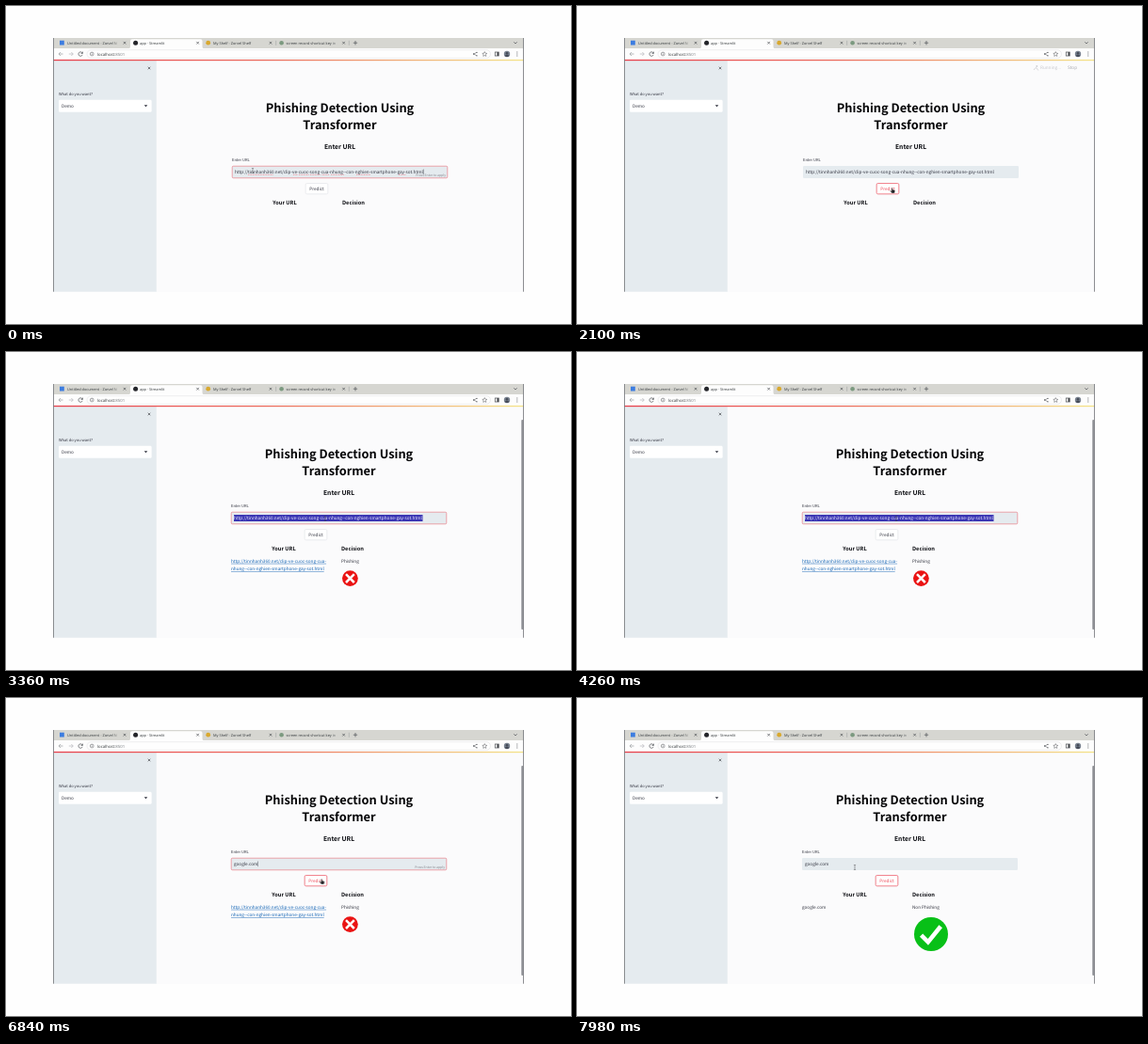
Recreate the animation shown at these times as an HTML page. Size 600 px wide and 338 px high, loop 8 s.

```html
<!DOCTYPE html>
<html lang="en">
<head>
<meta charset="utf-8">
<title>Phishing detection demo</title>
<style>
html, body { margin: 0; width: 100%; height: 100%; overflow: hidden; background: #fefefe; }
svg { display: block; width: 100%; height: 100%; }
text { font: 4.65px "Noto Sans CJK JP", "Noto Sans CJK SC", "Noto Sans CJK", "Open Sans", sans-serif; fill: #31333f; text-rendering: geometricPrecision; white-space: pre; }
.chrome text { font: 3.88px "Noto Sans", sans-serif; fill: #3c4043; }
.mid { text-anchor: middle; }
.h1 { font-size: 12.82px; font-weight: 700; fill: #050507; }
.h3 { font-size: 6.75px; font-weight: 700; fill: #0c0d12; }
.h4 { font-size: 5.72px; font-weight: 700; fill: #0c0d12; }
.label { font-size: 4.07px; }
.hint { font-size: 3.45px; fill: #85878f; text-anchor: end; }
.link { fill: #1465b5; text-decoration: underline; }
.icon { fill: none; stroke: #4c4f53; stroke-width: .7; }

/* visibility windows over the 8 s loop */
.on { animation: 8s step-end infinite; }
.edited { animation-name: edited; }
.hinted { animation-name: hinted; }
.focused { animation-name: focused; }
.selected { animation-name: selected; }
.address { animation-name: address; }
.active { animation-name: active; }
.running { animation-name: running; }
.phishing { animation-name: phishing; }
.safe { animation-name: safe; }
.scroll { animation-name: scroll; }
.beam { animation-name: beam; }
.hand { animation-name: hand; }
.content { animation-name: shift; }
.pointer { animation: move 8s ease-in-out infinite; }

@keyframes edited { 0% { opacity: 1 } 21.75%, 100% { opacity: 0 } }
@keyframes hinted { 0%, 55.5% { opacity: 1 } 21.75%, 86.25%, 100% { opacity: 0 } }
@keyframes focused { 0%, 37.5% { opacity: 1 } 21.75%, 86.25%, 100% { opacity: 0 } }
@keyframes selected { 0%, 55.5%, 100% { opacity: 0 } 40.5% { opacity: 1 } }
@keyframes address { 0% { opacity: 1 } 55.5%, 100% { opacity: 0 } }
@keyframes active { 0%, 37.5% { opacity: 0 } 18.75%, 81%, 100% { opacity: 1 } }
@keyframes running { 0%, 30.75%, 93%, 100% { opacity: 0 } 23.25%, 87% { opacity: 1 } }
@keyframes phishing { 0%, 93%, 100% { opacity: 0 } 30.75% { opacity: 1 } }
@keyframes safe { 0% { opacity: 0 } 93%, 100% { opacity: 1 } }
@keyframes scroll { 0% { opacity: 0 } 30.75%, 100% { opacity: 1 } }
@keyframes beam { 0%, 36%, 96%, 100% { opacity: 1 } 18%, 79.5% { opacity: 0 } }
@keyframes hand { 0%, 36%, 96%, 100% { opacity: 0 } 18%, 79.5% { opacity: 1 } }
@keyframes shift { 0% { transform: none } 30.75%, 100% { transform: translateX(-1px) } }
@keyframes move {
  0%, 4% { transform: translate(262px, 175px) }
  12%, 14% { transform: translate(349px, 181px) }
  19%, 34% { transform: translate(335px, 196px) }
  38%, 77% { transform: translate(339px, 177px) }
  81%, 94% { transform: translate(335.5px, 195px) }
  97.5%, 100% { transform: translate(295px, 180px) }
}
</style>
</head>
<body>
<svg viewBox="0 0 600 338">
  <defs>
    <linearGradient id="bar"><stop stop-color="#e8404c"/><stop offset=".45" stop-color="#ec6a5c"/><stop offset="1" stop-color="#f4e488"/></linearGradient>
    <linearGradient id="fade"><stop stop-color="#d6d6d1" stop-opacity="0"/><stop offset="1" stop-color="#d6d6d1"/></linearGradient>
    <path id="cross" d="M-1.3-1.3 1.3 1.3M1.3-1.3-1.3 1.3"/>
  </defs>
  <rect width="600" height="338" fill="#fefefe"/>

  <!-- page -->
  <rect x="50.5" y="57" width="499" height="246.7" fill="#fbfbfc"/>
  <rect x="50.5" y="57" width="109.3" height="246.7" fill="#e5ebef"/>
  <use href="#cross" class="icon" x="152" y="66"/>
  <text class="label" x="56" y="94.7">What do you want?</text>
  <rect x="56" y="99.7" width="98.6" height="13" rx="1.3" fill="#fff"/>
  <text x="59" y="107.9">Demo</text>
  <path d="M146.7 105.2h3.6l-1.8 2z" fill="#31333f"/>

  <g class="on running" fill="#a3a5ab">
    <circle cx="488.3" cy="64" r=".9" opacity=".5"/>
    <path d="M485 68l2-2.5 1.6 1 1.2 2" fill="none" stroke="#a3a5ab" stroke-width=".8" opacity=".5"/>
    <text x="492" y="67.3" font-size="4" opacity=".25">Running...</text>
    <text x="521" y="67.3" opacity=".4">Stop</text>
  </g>

  <g class="on content">
    <text class="h1 mid" x="354.5" y="113.3">Phishing Detection Using</text>
    <text class="h1 mid" x="354.5" y="130.5">Transformer</text>
    <text class="h3 mid" x="354.5" y="152.1">Enter URL</text>
    <text class="label" x="240" y="164.8">Enter URL</text>

    <rect x="240" y="170" width="229" height="13" rx="1.3" fill="#e5ebef"/>
    <rect class="on focused" x="240.2" y="170.2" width="228.6" height="12.6" rx="1.3" fill="none" stroke="#ec5663" stroke-width=".5"/>
    <text class="hint on hinted" x="467" y="181">Press Enter to apply</text>
    <text class="on address" id="address" x="243" y="178"></text>
    <path class="on edited" d="M257 179.3h27M305 179.3h5M311 179.3h11M323 179.3h11M335.5 179.3h8M345 179.3h14M372 179.3h15M417 179.3h8" stroke="#ef5060" stroke-width=".5" stroke-dasharray="1 .6"/>
    <g class="on selected">
      <rect x="243" y="173" width="200.5" height="7" fill="#3b36b4"/>
      <text id="picked" x="243" y="178" style="fill:#f1f1ff"></text>
    </g>
    <text id="typed" x="243" y="178"></text>
    <rect id="caret" y="173.5" width=".4" height="5.6" fill="#31333f"/>

    <rect x="318.2" y="188.5" width="23.6" height="11.3" rx="1.4" fill="#fff" stroke="#d9dbdf" stroke-width=".5"/>
    <text class="mid" x="330" y="195.6">Predict</text>
    <g class="on active">
      <rect x="318.2" y="188.5" width="23.6" height="11.3" rx="1.4" fill="#fff" stroke="#ef5362" stroke-width=".7"/>
      <text class="mid" x="330" y="195.6" style="fill:#ec4655">Predict</text>
    </g>

    <text class="h4 mid" x="296" y="211.1">Your URL</text>
    <text class="h4" x="357" y="211.1">Decision</text>
    <g class="on phishing">
      <text class="link" x="240" y="223.8">http://tinnhanh360.net/clip-ve-cuoc-song-cua-</text>
      <text class="link" x="240" y="232">nhung--con-nghien-smartphone-gay-sot.html</text>
      <text x="357" y="223.8">Phishing</text>
      <circle cx="366.4" cy="240.6" r="8.4" fill="#ea1313"/>
      <path d="M362 236.2l8.8 8.8M370.8 236.2l-8.8 8.8" stroke="#fff" stroke-width="2.5"/>
    </g>
    <g class="on safe">
      <text x="240" y="223.8">google.com</text>
      <text x="357" y="223.8">Non Phishing</text>
      <circle cx="377" cy="251" r="18" fill="#08c017"/>
      <path d="M366.6 252.2l7.2 7.2 13.4-16.6" fill="none" stroke="#fff" stroke-width="4.6"/>
    </g>
  </g>
  <rect class="on scroll" x="547.3" y="72" width="1.9" height="223" rx=".9" fill="#8f9196"/>

  <!-- browser frame -->
  <g class="chrome">
    <rect x="50.5" y="34" width="499" height="11.5" fill="#d6d6d1"/>
    <rect x="50.5" y="45" width="499" height="12" fill="#fdfdfd"/>
    <path d="M130 45.2q2 0 2-2v-6q0-2 2-2h72.5q2 0 2 2v6q0 2 2 2z" fill="#fdfdfd"/>
    <rect x="57" y="36.7" width="4.8" height="4.8" fill="#3d7de0"/>
    <circle cx="137.6" cy="39.3" r="2.5" fill="#25262b"/>
    <circle cx="214.7" cy="39.2" r="2.4" fill="#d9a92f"/>
    <circle cx="292.6" cy="39.2" r="2.3" fill="#7c9a80"/>
    <text x="65" y="40.6">Untitled document - Zorvel N</text>
    <text x="142" y="40.6">app · Streamlit</text>
    <text x="220" y="40.6">My Shelf - Zorvel Shelf</text>
    <text x="297.5" y="40.6">screen record shortcut key in</text>
    <rect x="113" y="36" width="9" height="7" fill="url(#fade)"/>
    <rect x="345" y="36" width="10" height="7" fill="url(#fade)"/>
    <rect x="122" y="36" width="2" height="7" fill="#d6d6d1"/>
    <rect x="355" y="36" width="1.2" height="7" fill="#d6d6d1"/>
    <g class="icon">
      <use href="#cross" x="126" y="39.2"/><use href="#cross" x="203.6" y="39.2"/>
      <use href="#cross" x="281" y="39.2"/><use href="#cross" x="358.6" y="39.2"/>
      <path d="M286.7 36.8v5M364.3 36.8v5" stroke="#85888c" stroke-width=".4"/>
      <path d="M368.8 39.2h4.4M371 37v4.4M539.3 38.3l1.7 1.7 1.7-1.7"/>
      <path d="M60.5 51h-4.4M58 49l-2 2 2 2" stroke="#999ca0"/>
      <path d="M66.8 51h4.4M69.3 49l2 2-2 2" stroke="#b5b7ba"/>
      <path d="M81.2 50.2a2.2 2.2 0 1 0 0 1.7M81.4 48.6v1.8h-1.8"/>
    </g>
    <rect x="86" y="46.7" width="428.5" height="8.6" rx="4.3" fill="#fefefe" stroke="#d3d5d7" stroke-width=".4"/>
    <g class="icon">
      <circle cx="91.2" cy="51" r="1.9" stroke-width=".5"/><path d="M91.2 50.6v1.4M91.2 49.6v.5" stroke-width=".5"/>
      <path d="M500 49.3l-3.3 1.7 3.3 1.8" stroke-width=".5"/>
      <path d="M500 49.3v.01M496.7 51v.01M500 52.8v.01" stroke-width="1.3" stroke-linecap="round"/>
      <path d="M508.3 48.6l.7 1.6 1.8.2-1.3 1.2.3 1.8-1.5-.9-1.5.9.3-1.8-1.3-1.2 1.8-.2z" stroke-width=".5"/>
      <rect x="519.3" y="49" width="4" height="4"/><path d="M522.2 49v4" stroke-width="1.6"/>
    </g>
    <text x="97" y="52.6" style="font-size:4.3px">localhost:<tspan fill="#7c8084">8501</tspan></text>
    <circle cx="532" cy="51" r="3.2" fill="#77808e"/>
    <path d="M529.6 53.1q2.4-3 4.8 0-2.4 2-4.8 0" fill="#454b57"/><circle cx="532" cy="50.2" r="1.2" fill="#454b57"/>
    <path d="M542.8 49v.01M542.8 51v.01M542.8 53v.01" stroke="#4c4f53" stroke-linecap="round"/>
  </g>
  <rect x="50.5" y="56.9" width="499" height="1.3" fill="url(#bar)"/>
  <path d="M50.5 34V303.7M549.5 34V303.7" stroke="#6f7276" stroke-width=".8"/>

  <g class="pointer">
    <path class="on beam" d="M-1.1-2.6q1.1 0 1.1.6 0-.6 1.1-.6M0-2V2M-1.1 2.6q1.1 0 1.1-.6 0 .6 1.1.6" fill="none" stroke="#3a3b40" stroke-width=".45"/>
    <path class="on hand" d="M-.9-2.4q.7-.6 1.1 0v1.5l2 .6q.7.3.5 1.2l-.6 2h-2.7l-2-2.3q.1-.8 1-.3l.7.5z" fill="#1e1f22" stroke="#fff" stroke-width=".3"/>
  </g>
</svg>
<script>
const LOOP = 8000;
const BLINK = 530;
const ADDRESS = "http://tinnhanh360.net/clip-ve-cuoc-song-cua-nhung--con-nghien-smartphone-gay-sot.html";
const WORD = "google.com";
const keyTimes = [4440, 4590, 4740, 4920, 5100, 5280, 5460, 5560, 5660, 5760];
const [address, picked, typed, caret] =
  ["address", "picked", "typed", "caret"].map(id => document.getElementById(id));
address.textContent = picked.textContent = ADDRESS;

let start;
function draw(now) {
  start ??= now;
  const t = (now - start) % LOOP;
  const count = keyTimes.filter(k => k <= t).length;
  const text = WORD.slice(0, count);
  if (typed.textContent !== text) typed.textContent = text;

  // the blink restarts with every key
  const lastKey = count ? keyTimes[count - 1] : -BLINK + 10;
  const editing = t < 1740 || (count && t < 6900);
  const lit = Math.floor((t - lastKey) / BLINK) % 2 === 0;
  const field = count ? typed : address;
  caret.setAttribute("x", 243.2 + field.getComputedTextLength());
  caret.setAttribute("opacity", editing && lit ? 1 : 0);
  requestAnimationFrame(draw);
}
requestAnimationFrame(draw);
</script>
</body>
</html>
```
